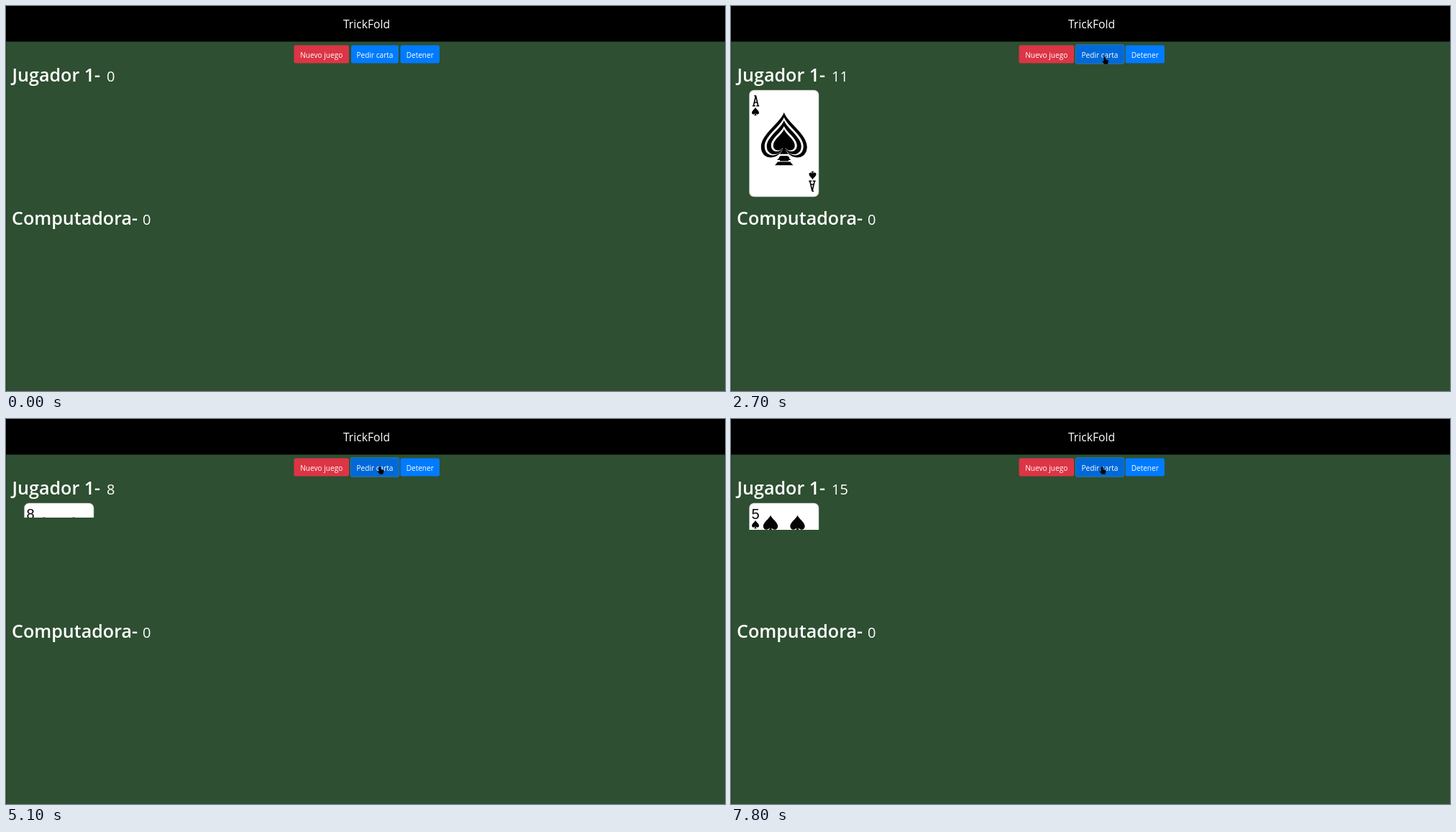
An HTML page for the animation above (7900 ms loop, 1000x535 px).

```html
<!DOCTYPE html>
<html lang="es">
<head>
<meta charset="utf-8">
<title>TrickFold</title>
<style>
  html, body { margin: 0; width: 100%; height: 100%; overflow: hidden; background: #2e4f31; }
  #stage { display: block; width: 100%; height: 100%; font-family: "Open Sans", "Noto Sans", sans-serif; fill: #fff; }
  .title { font-size: 15.7px; text-anchor: middle; }
  .label { font-size: 10.1px; text-anchor: middle; }
  .name { font-size: 25.1px; font-weight: 600; }
  .score { font-size: 20px; }
  .rank { font: 20px "Liberation Sans", Arial, sans-serif; text-anchor: middle; }
</style>
</head>
<body>
<svg id="stage" viewBox="0 0 1000 535">
  <defs>
    <path id="spade" d="M0-1.15C.15-.7 1-.2 1 .35C1 .9 .35 .95 .12 .55C.15 .85 .25 1 .4 1.15H-.4C-.25 1-.15 .85-.12 .55C-.35 .95-1 .9-1 .35C-1-.2-.15-.7 0-1.15Z"/>
    <g id="club">
      <circle cy="-.6" r=".5"/><circle cx="-.5" cy=".2" r=".5"/><circle cx=".5" cy=".2" r=".5"/>
      <path d="M-.2-.2H.2L.12 .4C.15 .8 .25 1 .42 1.12H-.42C-.25 1-.15 .8-.12 .4Z"/>
    </g>
    <path id="diamond" d="M0-1.3Q.45-.55 1 0Q.45 .55 0 1.3Q-.45 .55-1 0Q-.45-.55 0-1.3Z"/>
    <g id="A" fill="none" stroke="#000" stroke-width="1.6"><path d="M4.8 22.3h4M10.2 22.3h4M6.3 22L9.5 8.5L12.7 22M7.5 17.5h4M7.3 8.3h2.5"/></g>
    <g id="K" fill="none" stroke="#000" stroke-width="1.6"><path d="M4 8.5h4M4 22.3h4M6 8.5V22M11 8.5h3.5M11.3 22.3h3.5M13 9L6.3 16.5M8.6 14.5L13 22"/></g>
    <g id="king">
      <path d="M33 14H64L61 25H36Z" fill="#f4c430"/>
      <path d="M33 17H63M35 22H62" stroke="#d8321f" stroke-width="2.5"/>
      <path d="M40 26H58V43Q49 51 40 43Z" fill="#fff" stroke="#222" stroke-width=".7"/>
      <path d="M37 26Q41 37 34 44M61 26Q57 37 64 44M43 44Q49 52 55 44" fill="none" stroke="#1769b3" stroke-width="2.5"/>
      <path d="M44 33h3M51 33h3M49 34v5M46 41h6" stroke="#222" stroke-width=".8"/>
      <path d="M16 74.5V62Q24 43 38 42L49 52L60 42Q75 43 82 60V74.5Z" fill="#d8321f" stroke="#111"/>
      <path d="M23 74Q25 54 40 47M34 74Q35 59 45 52M75 74Q73 54 58 47M64 74Q63 59 53 52" fill="none" stroke="#111" stroke-width="3.5"/>
      <path d="M29 74Q30 56 43 50M69 74Q68 56 55 50" fill="none" stroke="#f4c430" stroke-width="2.5"/>
      <path d="M45 53H53V74H45Z" fill="#1769b3"/>
      <path d="M66 16H71V73H66Z" fill="#74b4e4" stroke="#1769b3"/>
      <path d="M62 58H75V64H62Z" fill="#fff" stroke="#1769b3"/>
      <path d="M73 15H82V57L73 48Z" fill="#1769b3"/>
      <path d="M76 17V50M79 17V53" stroke="#fff" stroke-width="1"/>
    </g>
  </defs>
  <path d="M0 0H1000V49.5H0Z" fill="#000"/>
  <path d="M.5 50V535" stroke="#243f27"/>
  <text class="title" x="501.5" y="31">TrickFold</text>
  <text class="name" x="8.5" y="105">Jugador 1-</text>
  <text class="name" x="8" y="304">Computadora-</text>
  <g id="live"></g>
</svg>
<script>
const LOOP = 7900, CARD_W = 97.5, CARD_H = 149, LOAD_SPEED = 0.5;

const buttons = [
  { id: 'new', x: 400.5, w: 76.5, text: 'Nuevo juego', colors: ['#dc3545', '#c82333', '#bd2130'], ring: '#e15361' },
  { id: 'hit', x: 480, w: 66, text: 'Pedir carta', colors: ['#007bff', '#0069d9', '#0062cc'], ring: '#268fff' },
  { id: 'stop', x: 548.5, w: 54.5, text: 'Detener', colors: ['#007bff', '#0069d9', '#0062cc'], ring: '#268fff' }
];
const clicks = [[850, 'new'], [1750, 'hit'], [2950, 'hit'], [4350, 'new'], [4850, 'hit'],
  [5350, 'hit'], [5650, 'hit'], [6900, 'new'], [7350, 'hit'], [7650, 'hit']];
const locks = [[3150, 4350], [5800, 6900]];

// time, player points, computer points
const scores = [[0, 0, 0], [1750, 11, 0], [2950, 22, 0], [3150, 22, 9], [4350, 0, 0], [4850, 8, 0],
  [5350, 18, 0], [5650, 27, 0], [5800, 27, 8], [6900, 0, 0], [7350, 5, 0], [7650, 15, 0]];

// first visible, removed, row, slot, rank, suit
const cards = [
  [2050, 4350, 0, 0, 'A', 'spade'], [3000, 4350, 0, 1, 'A', 'club'], [3200, 4350, 1, 0, '9', 'diamond'],
  [5060, 6900, 0, 0, '8', 'club'], [5400, 6900, 0, 1, 'K', 'spade'], [5680, 6900, 0, 2, '9', 'spade'],
  [5800, 6900, 1, 0, '8', 'spade'], [7726, LOOP, 0, 0, '5', 'spade']
];
const pointerPath = [[100, 470, 540], [700, 444, 70], [1000, 444, 70], [1500, 509, 70], [2500, 509, 70],
  [2900, 530, 70], [3800, 530, 70], [4200, 447, 70], [4500, 447, 70], [4800, 520, 66],
  [6300, 520, 66], [6750, 446, 68], [7000, 446, 68], [7300, 516, 66], [LOOP, 516, 66]];

const lastBefore = (list, t) => list.filter(e => e[0] <= t).pop();

const pip = (suit, x, y, size, flip = false) =>
  `<use href="#${suit}" transform="translate(${x} ${y}) rotate(${flip ? 180 : 0}) scale(${size})"/>`;

function pips(rank, suit) {
  const mid = 48.75;
  const [left, right] = rank === '9' && suit === 'spade' ? [27, 69] : suit === 'club' ? [28, 69] : [30, 67.5];
  const top = suit === 'club' ? 32 : 29;
  const rows = rank === '9' ? [30, 60, 89, 119] : rank === '8' ? [top, 74.5, CARD_H - top] : [top, CARD_H - top];
  const spots = rows.flatMap(y => [[left, y], [right, y]]);
  if (rank === '8') spots.push([mid, 52], [mid, 97]);
  else spots.push([mid, 74.5]);
  return spots.map(([x, y]) => pip(suit, x, y, suit === 'club' ? 11 : 10.2, y > 80)).join('');
}

function face(rank, suit) {
  if (rank === 'K') return `<use href="#king"/><use href="#king" transform="rotate(180 48.75 74.5)"/>
    <rect x="15.5" y="14" width="66.5" height="121" fill="none" stroke="#1769b3"/>
    ${pip(suit, 25, 28.5, 8.5)}${pip(suit, 72.5, 120.5, 8.5, true)}`;
  if (rank !== 'A') return pips(rank, suit);
  if (suit === 'club') return pip(suit, 48.5, 74.5, 13.2);
  const layers = [32, 27, 24, 18, 15].map((size, i) =>
    `<g fill="${i % 2 ? '#fff' : '#000'}">${pip(suit, 48.75, 68 + i, size)}</g>`).join('');
  return layers + '<path d="M42 94H56M43 98H55M41 102H57" stroke="#000" stroke-width="2"/>';
}

function card(t, [start, end, row, slot, rank, suit]) {
  const height = Math.min(CARD_H, (t - start) * LOAD_SPEED);
  if (height <= 0 || t >= end) return '';
  const glyph = isNaN(rank) ? `<use href="#${rank}"/>` : `<text class="rank" x="9" y="22.5">${rank}</text>`;
  const corner = glyph + pip(suit, 9, 30, suit === 'diamond' ? 4.2 : 5);
  return `<svg x="${25 + slot * 49.5}" y="${row ? 316 : 116.5}" width="${CARD_W}" height="${height}">
    <rect x=".25" y=".25" width="97" height="148.5" rx="7" fill="#fff" stroke="#888" stroke-width=".6"/>
    <g fill="${suit === 'diamond' ? '#d01f05' : '#050505'}">${face(rank, suit)}${corner}
    <g transform="rotate(180 48.75 74.5)">${corner}</g></g></svg>`;
}

function pointerAt(t) {
  const i = pointerPath.findIndex(p => p[0] > t);
  if (i < 1) return null;
  const [t0, x0, y0] = pointerPath[i - 1], [t1, x1, y1] = pointerPath[i];
  const k = (t - t0) / (t1 - t0), e = k * k * (3 - 2 * k);
  return [x0 + (x1 - x0) * e, y0 + (y1 - y0) * e];
}

function scene(t) {
  const locked = locks.some(([a, b]) => t >= a && t < b);
  const pointer = pointerAt(t);
  const [clickTime, focused] = lastBefore(clicks, t) || [-LOOP];
  let hand = false;

  const row = buttons.map(({ id, x, w, text, colors, ring }) => {
    const disabled = locked && id !== 'new';
    const hover = !disabled && pointer && pointer[0] > x && pointer[0] < x + w && pointer[1] > 55 && pointer[1] < 80;
    hand = hand || hover;
    const active = hover && id === focused && t - clickTime < 150;
    const halo = id === focused && !disabled
      ? `<rect x="${x - 1.5}" y="53" width="${w + 3}" height="28" rx="4" fill="${ring}" opacity=".5"/>` : '';
    return `${halo}<g opacity="${disabled ? 0.65 : 1}">
      <rect x="${x}" y="54.5" width="${w}" height="25" rx="2.5" fill="${colors[active ? 2 : hover ? 1 : 0]}"/>
      <text class="label" x="${x + w / 2}" y="71.5">${text}</text></g>`;
  }).join('');

  const [, player, computer] = lastBefore(scores, t);
  const shape = hand
    ? 'M0 0Q1.5 0 1.5 1.5V4L5 5Q6 5.5 5.5 7.5L4.5 11H-.5L-3.5 7Q-3.5 5.5-1.5 6.5V1.5Q-1.5 0 0 0Z'
    : 'M0 0V10L2.4 8L4 11.5L5.5 10.8L4 7.5H7Z';
  const cursor = pointer
    ? `<path d="${shape}" transform="translate(${pointer})" fill="#000" stroke="#1b5f80" stroke-width=".8"/>` : '';
  return `${row}<text class="score" x="140" y="105">${player}</text>
    <text class="score" x="190" y="304">${computer}</text>
    ${cards.map(c => card(t, c)).join('')}${cursor}`;
}

const live = document.getElementById('live');
const origin = performance.now();
function frame() {
  live.innerHTML = scene((performance.now() - origin) % LOOP);
  requestAnimationFrame(frame);
}
frame();
</script>
</body>
</html>
```
